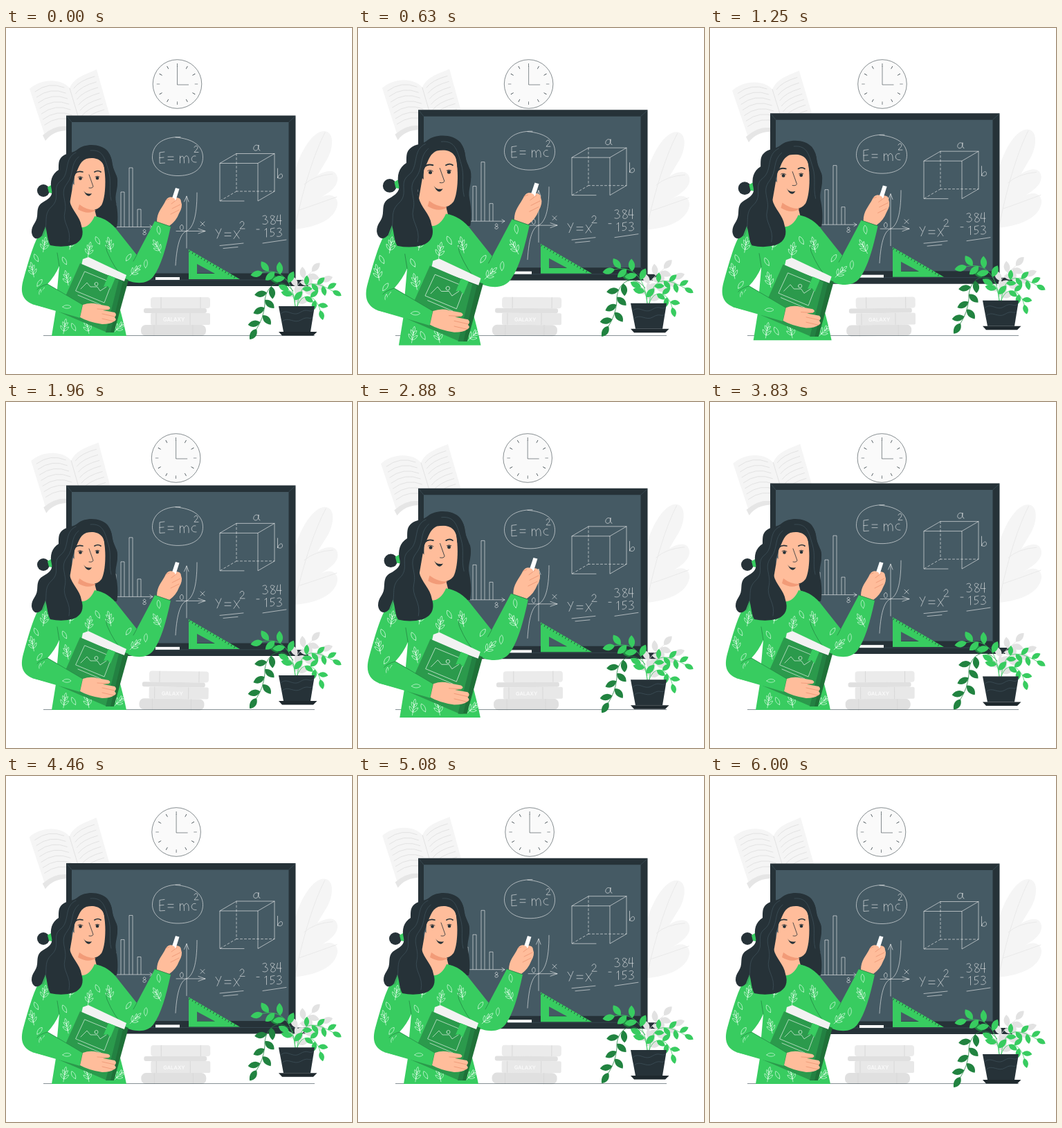
An HTML page for the animation above (6.04 s loop, 500 by 500 pixels).

```html
<!DOCTYPE html>
<html lang="en">
<head>
<meta charset="utf-8">
<title>Teacher at the blackboard</title>
<style>
html, body { margin: 0; width: 100%; height: 100%; overflow: hidden; background: #fff; }
svg { display: block; width: 100vw; height: 100vh; }
.line { fill: none; stroke-linecap: round; stroke-linejoin: round; }
.ink { stroke: #263238; stroke-width: .8; }
.seam { stroke: #238142; stroke-width: .7; }
.finger { stroke: #e88f6d; stroke-width: .7; }
.skin { fill: #ffbd9b; }
.hair { fill: #263238; }
.dress { fill: #38cc60; }
</style>
</head>
<body>
<svg viewBox="0 0 500 500">
<defs>
  <path id="leaf" d="M0 0C5-6.500 13-6.500 18 0C12 5.500 5 6 0 0Z"/>
  <path id="bud" d="M-6 0C-3-3.500 3-3.500 6 0C3 3-3 3-6 0Z"/>
  <path id="sprig" d="M-10 0H4M-6 0Q-5-5 1-6Q0-1-6 0Q-5 5 1 6Q0 1-6 0M0 0Q2-4 7-4Q6 0 0 0Q2 4 7 4Q6 0 0 0M4 0Q8-3 12 0Q8 3 4 0"/>
  <clipPath id="cloth">
    <path id="dress" d="M106 288Q120 290 128 272Q148 275 162 294L189 328L215 279L238 287C231 319 224 344 213 359C203 372 184 370 167 361L163 400Q170 425 174 445H66L72 408L38 399C24 393 20 382 25 364C34 333 42 300 57 286Z"/>
  </clipPath>
</defs>

<g id="backdrop">
  <path d="M34 88C50 73 80 72 92 87C98 71 118 66 131 60L150 127L102 146L89 141Q70 142 57 158Z" fill="#f5f5f5"/>
  <path d="M53 155Q70 140 89 142L102 128L103 133L90 148Q68 148 57 163Z" fill="#e6e6e6"/>
  <path class="line" id="pages" stroke="#e0e0e0" stroke-width=".9"/>
  <path d="M415 291L418 205C426 178 443 149 460 149C475 150 473 173 465 188L450 213C464 204 478 204 479 217C480 230 465 239 452 247C468 236 480 243 479 255C476 275 452 288 415 291Z" fill="#f5f5f5"/>
  <path class="line" d="M461 151Q438 195 418 285M472 211Q445 213 431 226M478 244Q445 256 424 263" stroke="#e6e6e6" stroke-width=".8"/>
  <rect x="209" y="389" width="86" height="16" rx="4" fill="#ebebeb"/>
  <rect x="199" y="405" width="91" height="7" rx="3" fill="#e0e0e0"/>
  <rect x="209" y="412" width="86" height="17" rx="2" fill="#e8e8e8"/>
  <rect x="195" y="429" width="94" height="16" rx="7" fill="#e0e0e0"/>
  <path d="M224 389v16M281 389v16M217 412v17M266 412v17M214 429v16M270 429v16" stroke="#d8d8d8"/>
  <text x="227" y="424" font-family="Inter, sans-serif" font-size="7.500" font-weight="600" fill="#fafafa">GALAXY</text>
</g>

<path d="M54 444.500H446" stroke="#37474f" stroke-width=".6"/>

<g id="clock" fill="none" stroke="#263238" stroke-width=".55">
  <circle cx="247.500" cy="81" r="35.300" fill="#fafafa"/>
  <circle cx="247.500" cy="81" r="27.500" stroke-width="4.500" pathLength="360" stroke-dasharray="1.300 28.700" stroke-dashoffset=".65"/>
  <path d="M247.500 55V82H264"/>
</g>

<g id="board">
  <path d="M87 126.500H418.500V364H437V373H87Z" fill="#263238"/>
  <path d="M95 136H408.500V354.500H95Z" fill="#455a64"/>
  <path d="M88 127.500L95 136M418 127.500L408.500 136M408.500 354.500L418 363.500M87 364H418" stroke="#455a64" stroke-width=".5"/>
  <path d="M264 320V363H338ZM276 341L302 355H276Z" fill="#38cc60" fill-rule="evenodd"/>
  <path d="M265 322.500L334 362.500" stroke="#263238" stroke-width="3" stroke-dasharray=".7 4.300"/>
  <rect x="216" y="360" width="35" height="4" fill="#fafafa"/>
  <g class="line" stroke="#f5f5f5" stroke-width=".6">
    <path id="bars"/>
    <path d="M150 287.500H212M208 285L212 287.500L208 290M200.500 295C196 294 199 290 201 291.500S201 295 200.500 295C196 296 198 300 201 298.500S202 295 200.500 295"/>
    <path d="M252 157.500C226 157 211 169 211.500 188C213 204 228 214 250 213.500C274 213 285 201 284.500 186C284 170 270 160 245 158"/>
    <path d="M229 179L222 180V195.500L229.500 195M222 187.500L228 187M234 186H242M234 190.500H242M251.500 185V195M251.500 188C254 183 258 184 257.500 195M257.500 188C260 182 265 184 264 195M274 185C267 183 265 195 275 194M272 172.500C274 168 279 171 276 175L272 179.500H278"/>
    <path d="M344 250H309V195.500H364V250L388 236V181.500H333L309 195.500M364 195.500L388 181.500"/>
    <path d="M333 181.500V236H388M333 236L309 250" stroke-dasharray="3 3"/>
    <path d="M364.500 170C359 166 355 176 360 177S365 171 365 169Q364 177 367 177M392.500 203V217C395 209 400 210 399.500 214S394 218 392.500 216"/>
    <path d="M246 293.500H288M278 290L288 293.500L278 297M261 318V243M257.500 251L261 243L264 251M245 343C247 310 253 296 261 293.500C270 289 276 274 276 238M281 280L287 286M287 280L281 286M254 284.500C250 285 251 292 254 292S257 284 254 284.500"/>
    <path d="M303 291L307 297M311 290L305 304M316 296H325M316 300.500H325M329.500 293L337 304M338 292L329 304.500M338 282C340 277 346 280 343 285L338 290H345M309 314.500L343 311M314 318.500L335 316.500"/>
    <path d="M371 272C376 269 379 273 374 276.500C381 277 379 286 371 283M388 272.500C383 268 379 274 386 277S388 285 384 283.500S386 277 388 272.500M392.500 271L391 278.500H398M396.500 270V284M362 291H366M374 292L376.500 289.500V302M388 289L382.500 290V295C390 293 389 302 382 301M392 290C398 287 400 292 394.500 295C401 296 399 303 391.500 301M371 311L405 306"/>
  </g>
</g>

<g id="plant">
  <g id="vines"></g>
  <path d="M394 402H446L440 439H401Z" fill="#263238"/>
  <path d="M394 439H449.500L444 444.500H399Z" fill="#1f292e"/>
  <path class="line" d="M397 413C406 404 414 418 425 411S438 412 444 408M399 424C408 416 416 428 426 422S437 421 442 419" stroke="#455a64" stroke-width=".6"/>
</g>

<g id="teacher">
  <circle class="hair" cx="54" cy="235" r="9"/>
  <path class="dress" d="M60 230L67 226V239L62 238Z"/>
  <path class="hair" d="M125 170C140 170 151 179 153 192C153 204 161 209 161 224C161 236 157 240 159 252C162 266 162 280 160 288H120L90 245Z"/>
  <path class="skin" d="M97 225L91 260L104 296H122L132 278L127 258Z"/>
  <use href="#dress" class="dress"/>
  <path d="M77 344Q71 358 60 370L74 378Z" fill="#fff"/>
  <g id="print" class="line" clip-path="url(#cloth)" stroke="#e8fff0" stroke-width=".6"></g>
  <path class="line seam" d="M148 310Q143 315 146 323Q156 347 170 361M189 328L184 337M77 344L74 325"/>

  <path class="skin" d="M105 188L139 188C146 213 144 245 138 256Q128 269 111 257Q96 243 99 215Z"/>
  <path d="M106 255Q118 264 130 263Q119 271 104 262Z" fill="#f29b78"/>
  <path class="hair" d="M143 210C143 190 130 186 116 189C105 194 105 204 99 214C97 226 89 236 92 250C95 264 107 272 109 286C113 298 110 308 98 313Q82 318 64 314C60 308 60 298 57 287L52 300C45 308 38 304 37 295C37 284 44 282 45 272C46 266 44 257 53 252C62 247 68 242 66 234C63 222 66 211 76 205C76 194 76 190 82 185C88 180 97 181 104 175C113 167 137 166 147 178C156 190 152 203 160 214C164 227 156 235 158 250C146 240 148 220 143 210Z"/>
  <path class="line" d="M101 180C83 188 93 210 79 221S80 245 66 258S63 283 53 301M105 186C92 197 99 211 88 225S89 250 85 266S95 290 91 309M122 177C141 175 143 190 148 206S148 233 152 249" stroke="#455a64" stroke-width=".6"/>
  <path class="line" d="M100 210Q104 206 111 208M128 208Q133 205 137 208" stroke="#263238" stroke-width="1.700"/>
  <circle class="hair" cx="107.500" cy="217.500" r="2.300"/>
  <circle class="hair" cx="132" cy="217" r="2.300"/>
  <path class="line ink" d="M104 215.500Q107 213 111 216M129 215Q132 213 135 215M120 212L126 229Q125 232 120 231"/>
  <path class="hair" d="M112 235Q116 241 124 239Q120 246 115 240Z"/>

  <path class="skin" d="M218 280C218 266 225 261 231 249Q235 243 243 245Q253 244 253 251Q256 258 250 268Q246 279 236 286Z"/>
  <path d="M239 249L245 231L250.500 232.500L245 250Z" fill="#fff"/>
  <path class="skin" d="M232 248Q235 242 243 246L245 249L239 254Z"/>
  <path class="line finger" d="M239 254L247 248M240 261L252 255M238 269L250 263M231 249L236 247"/>

  <path d="M110 338L177 364L156 440H146Z" fill="#1f7138"/>
  <path d="M111 334L119 331L174 357L171 366L109 343Z" fill="#f2f2f2"/>
  <path d="M107 340L165 365L146 440L76 410Z" fill="#2b9a4c"/>
  <path d="M163 364L169 366L151 440H144Z" fill="#238142"/>
  <path class="line" d="M114 352L153 368L142 397L101 380ZM108 377L117 368L122 374L132 374L136 380L145 374M104 386L137 400M128 370a2.500 2.500 0 1 0 5 0a2.500 2.500 0 1 0-5 0" stroke="#fff" stroke-width=".6"/>
  <path class="dress" d="M148 357L158 361L151 378L147 373L141 374Z"/>
  <path class="dress" d="M60 370L111 400L107 419L38 399Z"/>
  <use href="#bud" class="line" x="88" y="403" stroke="#e8fff0" stroke-width=".6"/>
  <path class="line seam" d="M45 378Q49 373 60 370L111 400L107 419M215 279L238 287"/>
  <path class="skin" d="M111 400Q122 396 132 399L148 402Q153 405 148 407L140 408L157 411Q161 414 157 418Q161 422 156 424Q151 428 139 428Q119 425 107 418Z"/>
  <path class="line finger" d="M132 406L148 407M139 413L157 417M139 420L156 424"/>
</g>
</svg>

<script>
const $ = id => document.getElementById(id);
const repeat = (n, f) => Array.from({ length: n }, (_, i) => f(i)).join('');

$('pages').setAttribute('d', 'M92 87L104 127' + repeat(7, i =>
  `M${42 + i * 2.3} ${92 + i * 8}q20-15 42-6m14 1q8-11 30-17`));
$('bars').setAttribute('d', [32, 50, 85, 25].map((h, i) =>
  `M${154 + i * 12} 287v${-h}h5v${h}`).join(''));

// Calls put(x, y, angle, index) at n even steps along a path, from the fraction `from` to its end.
function along(d, n, from, put) {
  const path = document.createElementNS('http://www.w3.org/2000/svg', 'path');
  path.setAttribute('d', d);
  const length = path.getTotalLength();
  return repeat(n, i => {
    const s = length * (from + (1 - from) * i / (n - 1));
    const p = path.getPointAtLength(s), q = path.getPointAtLength(s - 1);
    return put(p.x, p.y, Math.atan2(p.y - q.y, p.x - q.x) * 180 / Math.PI, i);
  });
}

// A stem with leaves on alternate sides and one at the tip.
function vine(d, n, size, fill, from = .35) {
  return `<path class="line" d="${d}" stroke="${fill}" stroke-width=".8"/>` +
    along(d, n, from, (x, y, angle, i) => {
      const side = i === n - 1 ? 0 : i % 2 ? -55 : 55;
      return `<use href="#leaf" fill="${fill}" transform="translate(${x} ${y}) rotate(${angle + side}) scale(${size})"/>`;
    });
}
const green = '#38cc60', dark = '#218340', gray = '#e2e2e2';
$('vines').innerHTML =
  vine('M418 402C410 370 435 360 442 352', 8, .95, gray, .1) +
  vine('M420 402C425 380 440 372 456 366', 6, .95, gray, .1) +
  vine('M415 380C395 355 372 375 374 400Q372 420 362 435', 8, 1, dark, .25) +
  vine('M418 402C416 376 404 345 371 353', 6, 1, green, .45) +
  vine('M418 402Q416 382 409 379', 3, .95, green) +
  vine('M421 402C425 362 445 365 472 380', 7, .8, green) +
  vine('M421 402C428 380 448 385 454 408', 5, .8, green);

// Sprigs and buds take turns along each part of the dress.
$('print').innerHTML = [
  ['M50 310L44 345Q32 375 70 392', 6],
  ['M88 308Q84 335 92 362', 3],
  ['M108 325L142 302L172 332L188 352L206 345L220 292', 8],
  ['M75 432H165', 5]
].map(([d, n]) => along(d, n, .04, (x, y, angle, i) =>
  `<use href="#${i % 2 ? 'bud' : 'sprig'}" transform="translate(${x + 6 * Math.cos(i * 2)} ${y}) rotate(${-80 + 40 * Math.sin(i * 5)})"/>`
)).join('');

// Linear interpolation through evenly spaced values.
function ramp(values, p) {
  const x = p * (values.length - 1), i = Math.floor(x);
  return values[i] + (values[i + 1] - values[i]) * (x - i);
}
const sway = [0, 1, 0, -1, 0];
const float = [0, -10, 0];
const shake = [0, -1, 2, -4, 4, -4, 4, -4, 2, -1, 0];
const beat = [1, 1.1, 1.05, 1, 1, 1.1, 1, 1, 1, 1, 1];
const move = (id, value) => $(id).setAttribute('transform', value);

function draw(now) {
  // The motion advances at 24 steps per second.
  const sec = Math.floor((now % 6040 + 5) * .024) / 24 % 6;
  const short = sec / 1.5 % 1, medium = sec / 3 % 1, long = sec / 6;
  move('backdrop', `rotate(${ramp(sway, short)} 250 250)`);
  move('board', `translate(0 ${ramp(float, short)})`);
  move('plant', `translate(0 ${ramp(float, medium)})`);
  move('clock', `translate(${ramp(shake, long)} 0)`);
  move('teacher', `translate(138 307.5) scale(${ramp(beat, long)}) translate(-138 -307.5)`);
}

const start = performance.now();
function tick() {
  draw(performance.now() - start);
  requestAnimationFrame(tick);
}
tick();
</script>
</body>
</html>
```
